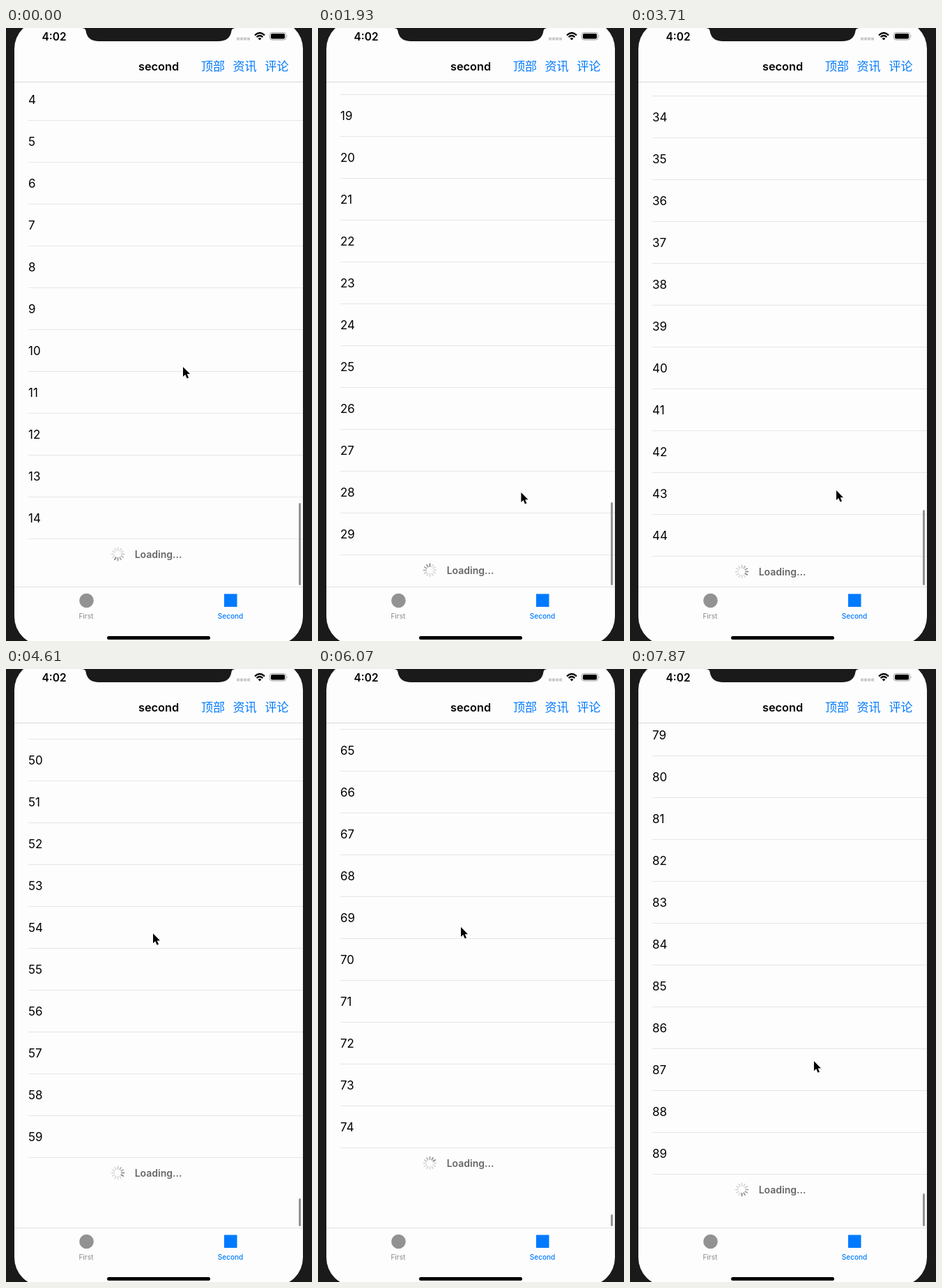
These frames come from a looping animation (439 px wide and 879 px high, 8 s). An HTML page:

```html
<!DOCTYPE html>
<html lang="zh">
<head>
<meta charset="utf-8">
<title>Infinite list</title>
<style>
  html, body { margin: 0; width: 100%; height: 100%; overflow: hidden; background: #1a1a1a; }
  svg { display: block; font-family: Inter, sans-serif; }
  .cjk { font-family: "Noto Sans CJK SC", "Noto Sans CJK", sans-serif; }
  .mid { text-anchor: middle; }
</style>
</head>
<body>
<svg width="439" height="879" viewBox="0 0 439 879">
  <defs>
    <clipPath id="listClip"><rect x="12" y="78" width="414" height="723"/></clipPath>
  </defs>
  <rect width="439" height="879" fill="#1a1a1a"/>
  <rect x="12" y="-11" width="414" height="896" rx="41" fill="#fdfdfd"/>

  <g clip-path="url(#listClip)">
    <g id="rows" font-size="17"></g>
    <g id="footer">
      <g id="spinner" transform="translate(160.5 0)"></g>
      <text x="218.5" y="5" class="mid" font-size="14" font-weight="600" fill="#666">Loading...</text>
    </g>
    <rect id="bar" x="420" width="3" rx="1.5" fill="#929292"/>
  </g>

  <path d="M108 0H330Q324 0 323.500 4C322 14 316 19 304 19H134C122 19 116 14 114.500 4Q114 0 108 0Z" fill="#1a1a1a"/>
  <text x="69" y="17.500" class="mid" font-size="15.500" font-weight="600">4:02</text>
  <path d="M331 15.500h19" stroke="#c9c9c9" stroke-width="4" stroke-dasharray="4 1"/>
  <g fill="none" stroke="#000" stroke-width="2.300">
    <path d="M357 10.300Q364 3.800 371 10.300M359.600 13Q364 9 368.400 13"/>
    <path d="M361.600 15L364 17.500L366.400 15Q364 13 361.600 15Z" fill="#000" stroke="none"/>
  </g>
  <rect x="378.500" y="6.500" width="23" height="10.500" rx="3" fill="none" stroke="#999"/>
  <rect x="380" y="8" width="20" height="7.500" rx="1.700"/>
  <path d="M403 10q1.500 1.700 0 3.500z" fill="#999"/>

  <text x="219" y="61" class="mid" font-size="16.300" font-weight="600">second</text>
  <g class="cjk" font-size="17" fill="#007aff">
    <text x="280" y="61">顶部</text>
    <text x="325.500" y="61">资讯</text>
    <text x="371.500" y="61">评论</text>
  </g>
  <rect x="12" y="77" width="414" height="1" fill="#d8d8d8"/>

  <rect x="12" y="801" width="414" height="1" fill="#e2e2e2"/>
  <circle cx="115.500" cy="821" r="10.300" fill="#929292"/>
  <rect x="313" y="811.500" width="18.500" height="18.500" fill="#007aff"/>
  <g class="mid" font-size="10" font-weight="500">
    <text x="115" y="847" fill="#999">First</text>
    <text x="322" y="847" fill="#007aff">Second</text>
  </g>
  <rect x="145" y="872" width="148" height="5" rx="2.500"/>

  <path id="cursor" d="M0 0V14L3.200 11L5.600 16.500L8 15.500L5.700 10.200H10Z" stroke="#fff" stroke-width="1.200" paint-order="stroke"/>
</svg>
<script>
const LOOP = 8000, ROW = 60, TOP = 77, PAGE = 15;
const $ = id => document.getElementById(id);
const clamp01 = v => Math.min(1, Math.max(0, v));
const smooth = p => p * p * (3 - 2 * p);
const mix = (a, b, p) => a + (b - a) * p;

function add(parent, tag, attrs) {
  const el = document.createElementNS(parent.namespaceURI, tag);
  for (const k in attrs) el.setAttribute(k, attrs[k]);
  return parent.appendChild(el);
}

// Each swipe: start time, press x/y, release x/y, scroll bar length
const swipes = [
  [-1032, 285, 690, 236, 394, 143],
  [556, 290, 670, 187, 335, 121],
  [2094, 292, 668, 221, 397, 108],
  [3760, 296, 663, 210, 375, 97],
  [5350, 285, 708, 205, 370, 88],
  [6893, 278, 680, 257, 531, 80],
  [8500, 290, 680, 257, 531, 80]
];

const rows = Array.from({ length: 14 }, () => {
  const g = add($("rows"), "g", {});
  add(g, "rect", { x: 32, y: 60, width: 394, height: 1, fill: "#e6e6e8" });
  return { g, label: add(g, "text", { x: 32, y: 36.7 }) };
});
const spokes = Array.from({ length: 12 }, (_, i) => add($("spinner"), "path", {
  d: "M0-5.500V-9", stroke: "#777", "stroke-width": 1.8, "stroke-linecap": "round",
  transform: `rotate(${i * 30})`
}));

function tick(t) {
  if (t >= 4870) return 4870 + Math.floor((t - 4870) / 150) * 150;
  return Math.min(31, Math.floor((t + 2) / 148.4)) * 148.4;
}

// Drag, fling, then bounce past the end of the page
function travel(u) {
  if (u < 260) return 320 * (u / 260) ** 2;
  if (u < 580) return 320 + 580 * (1 - Math.exp((260 - u) / 500)) / (1 - Math.exp(-0.64));
  const b = (u - 580) / 146;
  return 900 + Math.max(0, 74 * b * Math.exp(1 - b) - 3);
}

function render(time) {
  const t = tick(time);
  let i = 0;
  while (swipes[i + 1][0] <= t) i++;
  const [start, x0, y0, x1, y1, barLen] = swipes[i];
  const [, nextX, nextY] = swipes[i + 1];
  const u = t - start;
  const count = PAGE * (i + 1);
  const end = count * ROW - 680;
  const scroll = Math.round(end - 900 + travel(u));

  const first = Math.max(0, Math.floor(scroll / ROW));
  rows.forEach(({ g, label }, k) => {
    const n = first + k;
    g.setAttribute("visibility", n < count ? "visible" : "hidden");
    g.setAttribute("transform", `translate(0 ${TOP + n * ROW - scroll})`);
    label.textContent = n;
  });

  $("footer").setAttribute("transform", `translate(0 ${TOP + count * ROW + 22.5 - scroll})`);
  const head = Math.floor(2.3 + (u - 726) * 0.016);
  spokes.forEach((s, k) => {
    const age = (((head - k) % 12) + 12) % 12;
    s.setAttribute("opacity", Math.max(0.25, 0.9 - age * 0.13));
  });

  const over = Math.max(0, scroll - end);
  const barTop = 81 + (718 - barLen) * Math.min(1, scroll / end) + over;
  $("bar").setAttribute("y", barTop);
  $("bar").setAttribute("height", barLen - over);

  const drag = clamp01(u / 260) ** 2, back = smooth(clamp01((u - 800) / 600));
  const x = mix(mix(x0, x1, drag), nextX, back);
  const y = mix(mix(y0, y1, drag), nextY, back);
  $("cursor").setAttribute("transform", `translate(${x} ${y})`);
}

function frame() {
  render(performance.now() % LOOP);
  requestAnimationFrame(frame);
}
frame();
</script>
</body>
</html>
```
